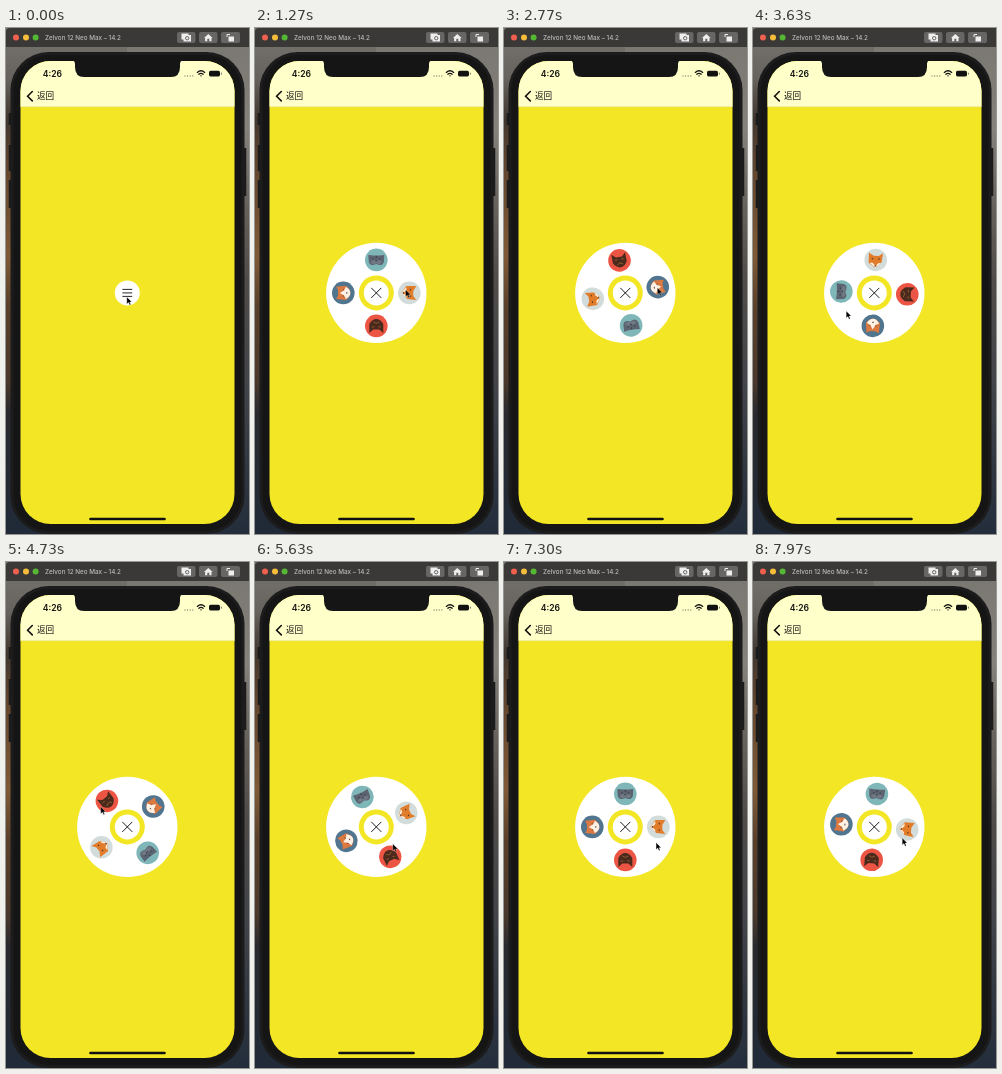
Recreate the animation shown at these times as an HTML page. Size 243 by 506 pixels, loop 8 s.

```html
<!DOCTYPE html>
<html lang="zh">
<head>
<meta charset="utf-8">
<style>
  html, body { margin: 0; width: 100%; height: 100%; overflow: hidden; background: #333; }
  svg { display: block; width: 100vw; height: 100vh; }
  text { font-family: Inter, "Noto Sans", sans-serif; }
  .line { fill: none; stroke: #111; stroke-linecap: round; }
  .tool { fill: none; stroke: #eee; stroke-width: 1; }
</style>
</head>
<body>
<svg viewBox="0 0 243 506" preserveAspectRatio="none">
  <defs>
    <linearGradient id="leftRock" x2="0" y2="1">
      <stop offset="0" stop-color="#77766f"/>
      <stop offset=".1" stop-color="#66625d"/>
      <stop offset=".18" stop-color="#41372f"/>
      <stop offset=".27" stop-color="#62452e"/>
      <stop offset=".45" stop-color="#805a36"/>
      <stop offset=".55" stop-color="#5a402b"/>
      <stop offset=".7" stop-color="#4a382b"/>
      <stop offset=".76" stop-color="#292a2f"/>
      <stop offset="1" stop-color="#202a38"/>
    </linearGradient>
    <linearGradient id="rightRock" x2="0" y2="1">
      <stop offset="0" stop-color="#77766f"/>
      <stop offset=".2" stop-color="#85817b"/>
      <stop offset=".35" stop-color="#68625c"/>
      <stop offset=".5" stop-color="#504c49"/>
      <stop offset=".7" stop-color="#43454a"/>
      <stop offset="1" stop-color="#232d3b"/>
    </linearGradient>
    <clipPath id="screen"><rect x="14.500" y="33" width="214" height="463" rx="30"/></clipPath>
  </defs>

  <!-- desktop and window bar -->
  <rect width="122" height="506" fill="url(#leftRock)"/>
  <rect x="121" width="122" height="506" fill="url(#rightRock)"/>
  <path d="M0 19V4Q0 0 4 0H243V19Z" fill="#3b3938"/>
  <circle cx="10" cy="9.500" r="3" fill="#f0604f"/>
  <circle cx="20" cy="9.500" r="3" fill="#f6bd3b"/>
  <circle cx="29.600" cy="9.500" r="3" fill="#55b834"/>
  <text x="39" y="12" font-size="6.300" font-weight="500" fill="#bdbbba">Zelvon 12 Neo Max – 14.2</text>
  <g fill="#686665">
    <rect x="171" y="4" width="18.500" height="11" rx="2"/>
    <rect x="193" y="4" width="18.500" height="11" rx="2"/>
    <rect x="215" y="4" width="19" height="11" rx="2"/>
  </g>
  <path d="M175.500 5.500H182.500V7H185V13.500H177.500V11.500H175.500Z" fill="#eee"/>
  <circle cx="181.200" cy="10.200" r="1.700" fill="none" stroke="#686665"/>
  <path d="M198 10L202.300 6L206.600 10H205.500V13.300H203.300V10.700H201.300V13.300H199.100V10Z" fill="#eee"/>
  <rect x="222.500" y="8.500" width="5.500" height="5" fill="#eee"/>
  <path class="tool" d="M221 9V6.500H224"/>

  <!-- phone -->
  <path d="M4 85V97M4 117V143M4 152V180M239 120V168" stroke="#1b1b1c" stroke-width="2.500"/>
  <rect x="4.500" y="24" width="234" height="482" rx="38" fill="#1c1c1d"/>
  <rect x="7.500" y="27" width="228" height="476" rx="35" fill="#151516"/>
  <g clip-path="url(#screen)">
    <rect x="14" y="33" width="215" height="464" fill="#f3e624"/>
    <rect x="14" y="33" width="215" height="45.700" fill="#ffffc9"/>
    <path d="M14 78.700H229" stroke="#e3e0a4" stroke-width=".5"/>
  </g>
  <path d="M66 32Q69 33 69 36V39Q69 49 78 49H165Q174 49 174 39V36Q174 33 177 32Z" fill="#151516"/>
  <text x="36.800" y="48.600" font-size="8.600" font-weight="600" fill="#111">4:26</text>
  <g fill="#8d8d72">
    <circle cx="179" cy="48" r=".7"/><circle cx="181.600" cy="48" r=".7"/>
    <circle cx="184.200" cy="48" r=".7"/><circle cx="186.800" cy="48" r=".7"/>
  </g>
  <g class="line" stroke-width="1.300">
    <path d="M191.300 44.400Q195 41.200 198.700 44.400M192.800 46.200Q195 44.400 197.200 46.200"/>
    <path d="M194.900 47.800H195.100"/>
  </g>
  <rect x="203" y="42.800" width="11" height="5.600" rx="1.600" fill="#111"/>
  <path d="M215.400 44.700V46.600" stroke="#555" stroke-width=".8"/>
  <path class="line" stroke-width="1.600" d="M26.300 63.500L21.600 68.200L26.300 72.900"/>
  <text x="31" y="71.300" font-size="8.600" fill="#111" style="font-family:'Noto Sans CJK SC','Noto Sans CJK',sans-serif">返回</text>
  <rect x="83.200" y="489.700" width="76.600" height="2.600" rx="1.300" fill="#111"/>

  <!-- radial menu -->
  <g transform="translate(121.300 264.900)">
    <g id="menu">
      <circle r="50.200" fill="#fff"/>
      <circle r="17.500" fill="#f3e624"/>
      <g id="wheel">
        <g transform="translate(0 -33)">
          <circle r="11.300" fill="#7fb7b9"/>
          <path d="M-8 -5L-3 -4.500H3L8 -5L7.500 2Q6 7 0 4Q-6 7 -7.500 2Z" fill="#5b6470"/>
          <path d="M-6 2Q-3 -1 0 1Q3 -1 6 2Q3 6 0 3Q-3 6 -6 2Z" fill="#6f7883"/>
          <path d="M-4 -1H-2.500M2.500 -1H4M0 -4V-2M-1 1H1" stroke="#30353d" stroke-width=".8"/>
        </g>
        <g transform="rotate(90) translate(0 -33)">
          <circle r="11.300" fill="#d2dcda"/>
          <path d="M-7 -7L-2 -4H3L7 -7L6 2L0 8L-7 3Z" fill="#e07c2a"/>
          <path d="M-6 3L-3 3L0 6L3 3L5 3L0 8Z" fill="#fff1df"/>
          <path d="M-4 -1H-2.500M2.500 -1H4M-1 6H1" stroke="#4b2c20"/>
        </g>
        <g transform="rotate(180) translate(0 -33)">
          <circle r="11.300" fill="#ec5543"/>
          <path d="M-7 -7L-3 -3.500H3L7 -7V2Q4 7 0 7T-7 2Z" fill="#4b2a1d"/>
          <path d="M-4.500 -1H-2M2 -1H4.500M-3 4Q0 1 3 4" fill="none" stroke="#94602f" stroke-width=".9"/>
        </g>
        <g transform="rotate(270) translate(0 -33)">
          <circle r="11.300" fill="#51748f"/>
          <g transform="scale(.88)">
            <path d="M-7 -8L-3 -6H3L7 -8L8 3Q4 8 0 8T-8 3Z" fill="#db7941"/>
            <path d="M0 -4L3 1L7 3Q4 8 0 8T-7 3L-3 1Z" fill="#fff2e5"/>
            <path d="M-4 0H-3M3 0H4M-1 4H1" stroke="#4b3432"/>
          </g>
        </g>
      </g>
    </g>
    <circle r="12.500" fill="#fff"/>
    <g class="line" stroke-width=".9">
      <path id="barTop"/><path id="barMiddle" d="M-4.500 0H4.500"/><path id="barBottom"/>
    </g>
    <path id="pointer" d="M0 0V7L1.700 5.500L2.900 8.200L4 7.700L2.900 5.100H5Z" fill="#000" stroke="#fff" stroke-width=".3"/>
  </g>
</svg>
<script>
const LOOP = 8000;
const byId = id => document.getElementById(id);

// [time, wheel angle], degrees clockwise
const spin = [[0, 0], [1350, 0], [2250, 180], [2680, 180], [2770, 170], [4150, -180], [4500, -180],
  [4730, -218], [5630, -385], [5900, -360], [7800, -360], [7970, -355.5], [8000, -355]];

// [time, angle from the top, distance from the hub]
const pointerPath = [[0, 180, 4], [650, 180, 4], [1050, 84, 30], [1350, 84, 30], [2250, 264, 32],
  [2680, 451, 33], [2770, 441, 33], [4150, 91, 33], [4500, -5, 33], [4730, -52, 33],
  [5630, -225, 24], [5900, -240, 30], [6300, -243.4, 35], [7500, -243.4, 35],
  [7800, -252, 31], [8000, -248.5, 30.5]];

// Smooth interpolation that never overshoots its keys
function sample(keys, time, column = 1) {
  const last = keys.length - 2;
  const slope = i => i < 0 || i > last ? 0 :
    (keys[i + 1][column] - keys[i][column]) / (keys[i + 1][0] - keys[i][0]);
  const tangent = i => {
    const a = slope(i - 1), b = slope(i);
    return a * b > 0 ? 2 * a * b / (a + b) : 0;
  };
  let i = 0;
  while (i < last && keys[i + 1][0] <= time) i++;
  const span = keys[i + 1][0] - keys[i][0];
  const u = (time - keys[i][0]) / span, v = 1 - u;
  return keys[i][column] * v * v * (1 + 2 * u) + keys[i + 1][column] * u * u * (3 - 2 * u)
    + span * u * v * (v * tangent(i) - u * tangent(i + 1));
}

function draw(time) {
  const progress = Math.min(1, Math.max(0, (time - 500) / 350));
  const open = 1 - (1 - progress) ** 3;
  byId('menu').setAttribute('transform', `scale(${0.2 + 0.8 * open})`);
  byId('wheel').setAttribute('transform', `rotate(${sample(spin, time)})`);
  byId('wheel').setAttribute('opacity', open);

  const half = 4.5 + 2.2 * open;
  const gap = 3.5 * (1 - open);
  for (const [id, side] of [['barTop', -1], ['barBottom', 1]]) {
    byId(id).setAttribute('d', `M${-half} 0H${half}`);
    byId(id).setAttribute('transform', `translate(0 ${side * gap}) rotate(${-side * 45 * open})`);
  }
  byId('barMiddle').setAttribute('opacity', 1 - open);

  const angle = sample(pointerPath, time) * Math.PI / 180;
  const radius = sample(pointerPath, time, 2);
  byId('pointer').setAttribute('transform',
    `translate(${radius * Math.sin(angle) - 0.5} ${-radius * Math.cos(angle)})`);
}

function tick() {
  draw(performance.now() % LOOP);
  requestAnimationFrame(tick);
}
tick();
</script>
</body>
</html>
```
